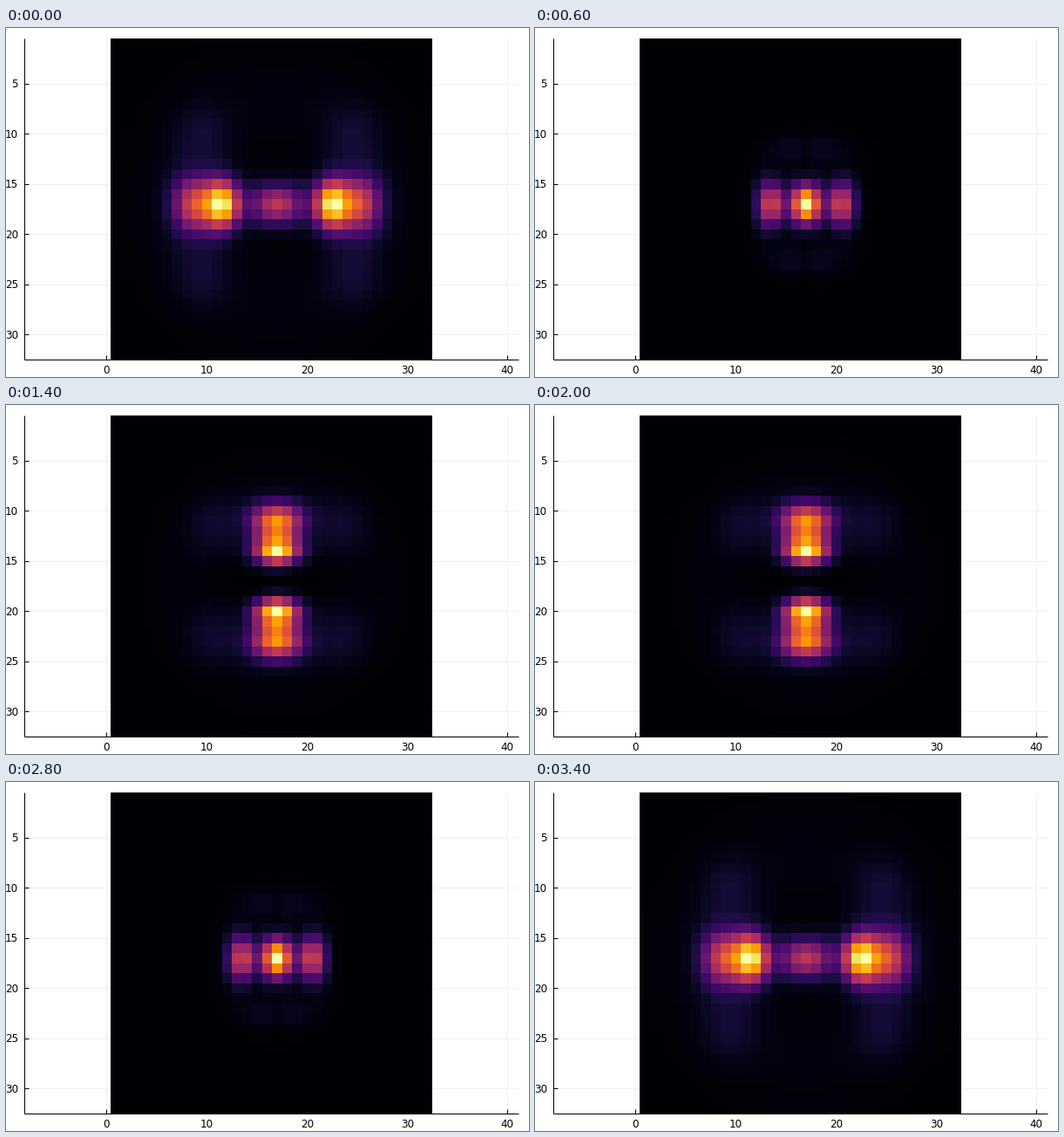
These frames come from a looping animation (600 px wide and 400 px high, 3600 ms). A matplotlib script:

```python
import numpy as np
import matplotlib.pyplot as plt
from matplotlib.animation import FuncAnimation

plt.rcParams["font.family"] = "DejaVu Sans"
WIDTH, HEIGHT, DPI = 600, 400, 100
PX = 72 / DPI
SIZE, CELL = 32, 11.5
AXIS_X, AXIS_END, AXIS_Y = 21, 588, 380
MAP_X, MAP_Y = 121, 12

# Distance from the spot centre along the two axes, in cells.
offset = np.abs(np.arange(1, SIZE + 1) - 17)
ALONG, ACROSS = np.meshgrid(offset, offset)
RADIUS = np.hypot(ALONG, ACROSS)


def bell(distance, width):
    return np.exp(-0.5 * (distance / width) ** 2)


def spot(defocus, *lobes):
    """Astigmatic spot stretched along x; each lobe is (strength, position, length)."""
    ridge = sum(strength * bell(ALONG - position, length) for strength, position, length in lobes)
    image = ridge * bell(ACROSS, 1.3 + 0.07 * ALONG)
    # Side lobes and a faint ring spread and brighten with defocus.
    image += ((0.045 + 0.005 * defocus) * bell(ALONG - 2 * defocus + 0.5, 1.9)
              * bell(ACROSS - 5 - 0.4 * defocus, 0.7 + 0.4 * defocus))
    image += 0.006 * defocus * np.exp(-((RADIUS - 6 - defocus) / (2 + defocus)) ** 2)
    return image / image.max()


wide = [
    spot(4, (0.46, 0, 1.8), (0.82, 5.4, 1.2), (0.5, 8.2, 1.5)),
    spot(3, (0.85, 3, 0.9), (0.7, 5.8, 1.3)),
    spot(2, (0.36, 0, 0.9), (1, 3.9, 1.25)),
    spot(1, (1, 0, 1), (0.57, 3.5, 0.95)),
]
middle = (wide[-1] + wide[-1].T) / 2
# Past the focus the stretch turns from horizontal to vertical.
stack = wide + [middle] + [image.T for image in reversed(wide)]

fig = plt.figure(figsize=(WIDTH / DPI, HEIGHT / DPI), dpi=DPI, facecolor="white")
ax = fig.add_axes([0, 0, 1, 1])
ax.axis("off")


def line(x, y, **style):
    ax.plot(x, y, solid_capstyle="butt", **{"color": "black", "lw": PX, **style})


def label(x, y, value, align):
    ax.text(x, y, str(value), ha=align, va="baseline", fontsize=12 * PX)


grid = dict(color="#f0f0f0", zorder=0)
for value in range(0, 41, 10):
    x = MAP_X + CELL * (value - 0.5)
    line([x, x], [MAP_Y, AXIS_Y], **grid)
    line([x, x], [AXIS_Y, AXIS_Y - 5])
    label(x, 396, value, "center")
for value in range(5, 31, 5):
    y = MAP_Y + CELL * (value - 0.5)
    line([AXIS_X, AXIS_END], [y, y], **grid)
    line([AXIS_X, AXIS_X + 5], [y, y])
    label(14, y + 4.3, value, "right")
line([AXIS_X, AXIS_X], [MAP_Y, AXIS_Y])
line([AXIS_X, AXIS_END], [AXIS_Y, AXIS_Y])

edges = CELL * np.arange(SIZE + 1)
ax.add_patch(plt.Rectangle((MAP_X - 1, MAP_Y), edges[-1] + 1, edges[-1], color="black", lw=0))
heatmap = ax.pcolormesh(MAP_X + edges, MAP_Y + edges, stack[0], cmap="inferno",
                        vmin=0, vmax=1, antialiased=False, zorder=1.5)
ax.set_xlim(0, WIDTH)
ax.set_ylim(HEIGHT, 0)

FRAMES = 2 * len(stack)


def update(frame):
    # Through focus and back again.
    heatmap.set_array(stack[min(frame, FRAMES - 1 - frame)])
    return [heatmap]


anim = FuncAnimation(fig, update, frames=FRAMES, interval=200, repeat=True, repeat_delay=0)
plt.show()
```
